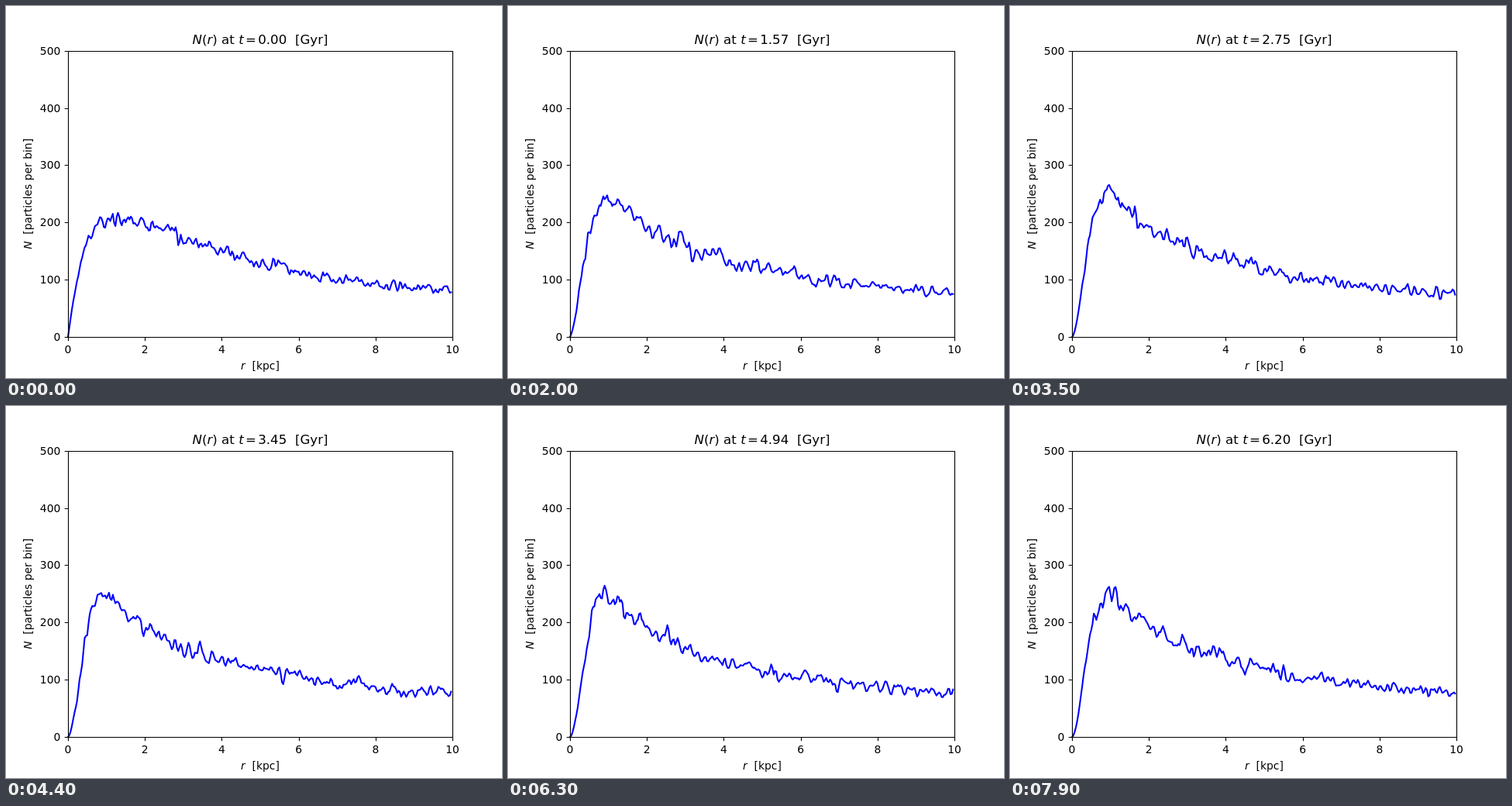
Write an HTML page that moves like this. It is 640 px wide and 480 px high and loops after 8 s.

```html
<!DOCTYPE html>
<html lang="en">
<head>
<meta charset="utf-8">
<title>Radial particle counts</title>
<style>
  html, body { margin: 0; width: 100%; height: 100%; overflow: hidden; background: #fff; }
  svg { display: block; width: 640px; height: 480px; }
  text { font: 13.89px "DejaVu Sans", sans-serif; white-space: pre; text-anchor: middle; }
  #title { font-size: 16.67px; }
  .end { text-anchor: end; }
  .it { font-style: italic; }
  #curve { fill: none; stroke: #00f; stroke-width: 2.08; stroke-linejoin: round; stroke-linecap: square; }
  #axes { fill: none; stroke: #000; stroke-width: 1.11; }
</style>
</head>
<body>
<svg viewBox="0 0 640 480">
  <polyline id="curve"/>
  <path id="axes"/>
  <g id="labels"></g>
  <text id="title" x="328" y="49"><tspan class="it">N</tspan>(<tspan class="it">r</tspan>) at <tspan class="it">t</tspan><tspan dx="2.3">=</tspan><tspan id="clock" dx="2.3">0.00</tspan>  [Gyr]</text>
  <text x="328" y="469"><tspan class="it">r</tspan>  [kpc]</text>
  <text transform="translate(33 242.4) rotate(-90)"><tspan class="it">N</tspan>  [particles per bin]</text>
</svg>
<script>
const STEP = 100, STEPS = 80, GYR_PER_STEP = 20 / 255;
const BINS = 300, BINS_PER_KPC = 30;
const $ = id => document.getElementById(id);
const px = r => 80 + 49.6 * r;
const py = n => 427.2 - 0.7392 * n;
const snap = v => Math.round(v) + 0.5;

// A power-law tail that is emptied towards the centre
const profile = (r, scale, shift, power, core, steep) =>
  scale / (r + shift) ** power * (1 - Math.exp(-((r / core) ** steep)));
const initial = r => profile(r, 1058, 3.22, 1, 0.57, 1.05);
const settled = r => profile(r, 404, 0.87, 0.7, 0.547, 1.85);

function random(seed) {
  return () => {
    seed = (seed + 0x6D2B79F5) | 0;
    let t = Math.imul(seed ^ (seed >>> 15), 1 | seed);
    t = (t + Math.imul(t ^ (t >>> 7), 61 | t)) ^ t;
    return ((t ^ (t >>> 14)) >>> 0) / 4294967296;
  };
}

function curve(step) {
  const rnd = random(step * 7919 + 17);
  const normal = () => (rnd() + rnd() + rnd() + rnd() - 2) * Math.sqrt(3);
  const white = Array.from({ length: BINS + 2 }, normal);
  const mix = 1 - Math.exp(-step * GYR_PER_STEP);
  let points = "";
  for (let i = 0; i < BINS; i++) {
    const r = i / BINS_PER_KPC;
    const mean = initial(r) + (settled(r) - initial(r)) * mix;
    const noise = (white[i] + 2 * white[i + 1] + white[i + 2]) / Math.sqrt(6);
    const n = Math.max(0, mean + 0.58 * Math.sqrt(mean) * noise * Math.min(1, r / 0.4));
    points += px(r).toFixed(2) + "," + py(n).toFixed(2) + " ";
  }
  return points;
}

function drawAxes() {
  let path = "M80.5 58.5H576.5V427.5H80.5Z", labels = "";
  for (let i = 0; i <= 5; i++) {
    const x = px(2 * i), y = py(100 * i);
    path += `M${snap(x)} 427.5v4.86M80.5 ${snap(y)}h-4.86`;
    labels += `<text x="${x}" y="448">${2 * i}</text>`;
    labels += `<text class="end" x="70.3" y="${Math.round(y + 5)}">${100 * i}</text>`;
  }
  $("axes").setAttribute("d", path);
  $("labels").innerHTML = labels;
}

const start = performance.now();
let shown = -1;
function draw() {
  const step = Math.floor(Math.max(0, performance.now() - start) / STEP) % STEPS;
  if (step !== shown) {
    shown = step;
    $("curve").setAttribute("points", curve(step));
    $("clock").textContent = (step * GYR_PER_STEP).toFixed(2);
  }
  requestAnimationFrame(draw);
}
drawAxes();
draw();
</script>
</body>
</html>
```
